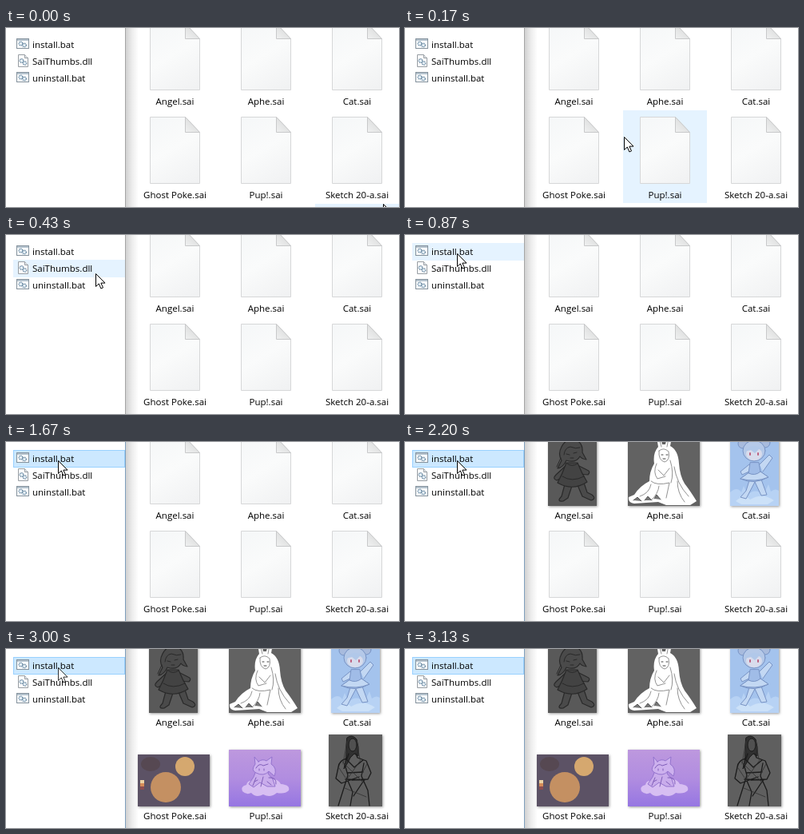
These frames come from a looping animation (492 by 224 pixels, 4.53 s). An HTML page with a canvas:

```html
<!DOCTYPE html>
<html lang="en">
<head>
<meta charset="utf-8">
<title>Thumbnail installer</title>
<style>
html, body { margin: 0; height: 100%; overflow: hidden; background: #fff; }
canvas { display: block; width: 100vw; height: 100vh; }
</style>
</head>
<body>
<canvas id="stage" width="492" height="224"></canvas>
<script>
const c = document.getElementById('stage').getContext('2d');
const LOOP = 4530, FPS = 30;
const clamp = (v, lo = 0, hi = 1) => Math.max(lo, Math.min(hi, v));

const rect = (x, y, w, h, fill) => { c.fillStyle = fill; c.fillRect(x, y, w, h); };
const frame = (x, y, w, h, color) => {
  c.lineWidth = 1; c.strokeStyle = color; c.strokeRect(x + .5, y + .5, w - 1, h - 1);
};
function shape(d, fill, stroke, width = 1) {
  const p = new Path2D(d);
  if (fill) { c.fillStyle = fill; c.fill(p); }
  if (stroke) { c.strokeStyle = stroke; c.lineWidth = width; c.stroke(p); }
}
function oval(x, y, rx, ry, fill, stroke, width = 1) {
  c.beginPath(); c.ellipse(x, y, rx, ry, 0, 0, 7);
  if (fill) { c.fillStyle = fill; c.fill(); }
  if (stroke) { c.strokeStyle = stroke; c.lineWidth = width; c.stroke(); }
}
function gradient(x0, y0, x1, y1, ...colors) {
  const g = c.createLinearGradient(x0, y0, x1, y1);
  colors.forEach((col, i) => g.addColorStop(i / (colors.length - 1), col));
  return g;
}
function text(s, x, y, align) {
  c.font = '11.5px "Open Sans", "Noto Sans", sans-serif';
  c.textAlign = align; c.fillStyle = '#000'; c.fillText(s, x, y);
}

// Cursor keys: step, x, y
const keys = [[0, 472, 220], [5, 274, 136], [13, 112, 48], [16, 82, 35], [26, 65, 23]];
function slope(i, axis) {
  if (i === keys.length - 1) return 0;
  const a = keys[Math.max(i - 1, 0)], b = keys[i + 1];
  return (b[axis] - a[axis]) / (b[0] - a[0]);
}
function cursorAt(k) {
  k = Math.min(k, 26);
  const i = Math.max(0, keys.findIndex(p => p[0] >= k) - 1);
  const a = keys[i], b = keys[i + 1], span = b[0] - a[0], u = (k - a[0]) / span;
  return [1, 2].map(n => Math.round(
    a[n] * (1 + 2 * u) * (1 - u) ** 2 + b[n] * u * u * (3 - 2 * u) +
    span * u * (1 - u) * (slope(i, n) * (1 - u) - slope(i + 1, n) * u)));
}
function drawCursor(x, y) {
  c.save(); c.translate(x + .5, y + .5);
  shape('M0 0V16L3.8 12.5 6.4 18.5 9 17.4 6.4 11.6H11.5Z', '#fff', '#000');
  c.restore();
}

function gear(x, y, r) {
  c.setLineDash([1.2, .8]); oval(x, y, r, r, '#d9e8f2', '#64829b', 1.3); c.setLineDash([]);
  oval(x, y, .8, .8, '#fff');
}
function batIcon(y) {
  rect(13, y, 16, 13, '#fafcfd'); frame(13, y, 16, 13, '#84919c');
  rect(14, y + 1, 14, 2, '#b5c3ce');
  gear(18.5, y + 6.5, 2.4); gear(23, y + 8.5, 2.3);
}
function dllIcon(y) {
  shape(`M15.5 ${y + .5}h8l4 4v11h-12Z`, '#fbfbfb', '#979da3');
  shape(`M23.5 ${y + .5}v4h4`, '#e6e9eb', '#979da3');
  gear(19.5, y + 8, 2.4); gear(23.5, y + 11, 2.2);
}
function page(x, y) {
  c.save(); c.translate(x + .5, y + .5);
  shape('M0 0H44L62 19V83H0Z', gradient(0, 0, 50, 83, '#f5f7f8', '#fafbfb', '#f1f2f3'), '#d6d7d8');
  shape('M44 0V19H62Z', gradient(44, 19, 55, 7, '#f0f1f1', '#dedfdf'), '#c8c9ca');
  c.restore();
}

function thumb(x, y, w, h, fill, art) {
  c.save();
  c.shadowColor = '#0006'; c.shadowBlur = 3; c.shadowOffsetX = c.shadowOffsetY = 1;
  rect(x, y, w, h, fill);
  c.restore();
  c.save();
  c.beginPath(); c.rect(x, y, w, h); c.clip();
  c.translate(x, y); c.lineJoin = c.lineCap = 'round';
  art();
  c.restore();
}

function angel() {
  const ink = '#292929', tone = '#4a4a4a';
  shape('M21 55L17 70Q10 77 19 76L25 72L30 57M37 56L43 70L54 75Q61 73 55 68L49 65L45 53', tone, ink, 1.2);
  shape('M23 31L10 43Q5 48 11 50L24 43M37 31L49 37Q54 39 50 43L39 42', tone, ink, 1.2);
  shape('M23 28Q18 42 12 53Q31 64 49 52Q42 41 37 28Z', '#434343', ink, 1.2);
  shape('M17 8Q24 -5 36 0Q44 4 43 15L48 24Q42 23 40 20Q35 29 23 25Q19 34 12 35L17 25Q12 17 17 8Z', tone, ink, 1.2);
  shape('M20 18Q21 9 28 8Q35 11 40 9M23 17l4 1M32 16l4 -1M28 22h4M16 22L11 33M24 29Q30 34 37 29M18 45Q30 53 45 45', null, ink);
}
function aphe() {
  const ink = '#777';
  shape('M36 -4L38 8Q31 16 33 29Q27 39 27 51Q15 57 8 68L1 71Q0 78 8 79L38 77L48 81H78L86 76Q78 63 71 54Q65 44 64 29Q63 12 53 7L55 -4H49L47 5H43L41 -4Z', '#fff');
  shape('M39 -3L42 8M51 -3L49 8M39 13Q45 8 51 14Q53 25 46 27Q38 25 39 13M36 29Q31 40 37 48L47 45M53 25Q58 41 54 53M38 37L45 44L52 35M29 51Q36 57 52 53L48 72M58 33Q61 54 76 70M62 51Q62 66 71 77M29 55Q27 66 15 70M39 57Q38 67 29 75', null, ink, .8);
  shape('M42 18h2M48 18h2M44 23h3', null, '#444');
  shape('M7 75L12 71L17 76M21 75L25 70L30 75M33 73L36 68L41 74', '#777', '#555');
}
function cat() {
  const ink = '#7893c4', pale = '#c3d8f3';
  shape('M0 65Q9 57 14 65L17 57L22 68Q31 59 42 68L48 55L51 64Q57 59 62 64V82H0Z', '#b7d2f4');
  shape('M7 76Q17 66 25 74Q40 65 55 75L47 80H14Z', '#cce1f8');
  shape('M25 47L20 63L13 71L20 73L31 52L39 69L46 68L38 46Z', pale, ink);
  shape('M24 30L13 39L15 43L26 38M37 30L49 18L53 22L41 39', pale, ink);
  shape('M25 28L23 41L13 48Q30 56 48 46L38 39L36 28Z', '#a0bce7', ink);
  shape('M23 41Q31 45 38 39L48 46Q32 53 13 48Z', pale, ink);
  oval(16, 4, 6, 6, '#a8bbdd', ink); oval(44, 3, 6, 6, '#a8bbdd', ink);
  oval(30, 13, 14, 13, '#b5c9e8', ink);
  oval(30, 17, 10, 8, '#d8dcec');
  shape('M18 14Q30 0 42 13L36 11L31 16L26 12Z', '#b1c8e9');
  shape('M25 16v2M35 16v2', null, '#bd6181', 2);
}
function ghosts() {
  oval(16, 12, 12, 9, '#564852');
  oval(59, 15, 12, 12, '#d5a86f');
  oval(35, 41, 19, 19, '#c49062');
  [['#ecd2a3', 32], ['#d68b58', 36], ['#8c4e50', 40]].forEach(([col, y]) => rect(3, y, 5, 4, col));
}
function pup() {
  const ink = '#9473ce';
  shape('M17 52Q14 46 22 44Q23 38 31 39Q42 32 51 38Q61 35 65 43Q77 44 75 51Q70 56 60 54Q52 61 43 56Q34 61 28 54Q22 57 17 52Z', '#d7bef2');
  shape('M35 24L31 34L25 43L31 47L39 41L48 46L58 46L55 37L49 30L51 22Z', '#c9aceb', ink);
  shape('M37 15L32 9L33 18Q27 26 34 29Q44 34 50 27L57 33Q61 23 53 18L54 9L47 14Q42 11 37 15Z', '#cdb1ee', ink);
  shape('M34 23Q38 16 43 20L49 18M38 24v2M44 24v2M34 35L30 45M43 34L40 46M50 35Q60 34 59 43M36 38L32 40M48 40L53 44', null, '#805eb9');
}
function sketch() {
  const ink = '#1b1b1b';
  shape('M23 4Q29 -1 35 6Q38 15 37 27L32 24L27 29L24 35L19 43Q23 27 22 15Z', '#303030', ink);
  oval(30, 13, 5, 8, '#505050', ink);
  shape('M25 24L23 30Q13 32 12 41L9 55L16 61L38 53M34 24L36 29L47 33L53 48L49 56L29 57M22 31L32 41L43 32M20 37L24 51L18 70L12 89M44 36L41 52L49 70L51 89M23 48L43 47M21 56L45 57M24 58L30 72L27 89M43 59L31 77', null, ink, 1.3);
  shape('M17 34L43 60M40 32L23 56M20 67L47 78M13 42L21 54M48 37L41 50M23 8L18 37M35 8L39 31', null, '#303030', .8);
}

// Thumbnail geometry: x, y, width, height, background, artwork
const files = [
  ['Angel.sai', [179, -2, 61, 82, '#595959', angel]],
  ['Aphe.sai', [279, -2, 90, 82, '#626262', aphe]],
  ['Cat.sai', [407, -2, 61, 82, '#a4c3ed', cat]],
  ['Ghost Poke.sai', [165, 132, 90, 65, '#5c5265', ghosts]],
  ['Pup!.sai', [279, 126, 90, 71, gradient(0, 126, 0, 197, '#bd98de', '#b18de0', '#9676e2'), pup]],
  ['Sketch 20-a.sai', [404, 107, 67, 90, '#5f5f5f', sketch]],
];

function draw(k) {
  const [x, y] = cursorAt(k), active = clamp((k - 41) / 2);
  rect(0, 0, 492, 224, '#fff');

  // Right window
  const col = Math.floor((x - 159) / 114), row = Math.floor((y + 14) / 117);
  if (x >= 159 && (x - 159) % 114 < 105) rect(159 + col * 114, -14 + row * 117, 105, 116, '#e5f3ff');
  files.forEach(([name, art], i) => {
    const cx = 211.5 + i % 3 * 114, r = Math.floor(i / 3);
    if (k >= 66 + r) thumb(...art);
    else page(cx - 31.5, -6 + r * 117);
    text(name, cx, 96 + r * 117, 'center');
  });

  // Left window with its shadow
  rect(150, 0, 16, 224, gradient(150, 0, 166, 0, '#0000002e', '#00000012', '#0000'));
  rect(0, 0, 149, 224, '#fff');
  rect(149, 0, 1, 224, '#a5a5a5');
  c.globalAlpha = active;
  rect(149, 0, 1, 224, '#7f9fbd');
  c.globalAlpha = 1;
  const hover = Math.floor((y - 10) / 21);
  if (x < 149 && hover < 3) {
    rect(9, 10 + hover * 21, 140, 22, '#e5f3ff');
    c.globalAlpha = active;
    rect(9, 10, 140, 22, '#cce8ff');
    c.globalAlpha = clamp((k - 48) / 2);
    frame(9, 10, 140, 22, '#99d1ff');
    c.globalAlpha = 1;
  }
  batIcon(13); dllIcon(33); batIcon(55);
  ['install.bat', 'SaiThumbs.dll', 'uninstall.bat'].forEach((s, i) => text(s, 33, 25 + i * 21, 'left'));

  c.globalAlpha = 1 - clamp((k - 89) / 5);
  drawCursor(x, y);
  c.globalAlpha = 1;
}

function tick() {
  const t = performance.now() % LOOP;
  draw(Math.floor((t + 3.4) * FPS / 1000));
  requestAnimationFrame(tick);
}
tick();
</script>
</body>
</html>
```
